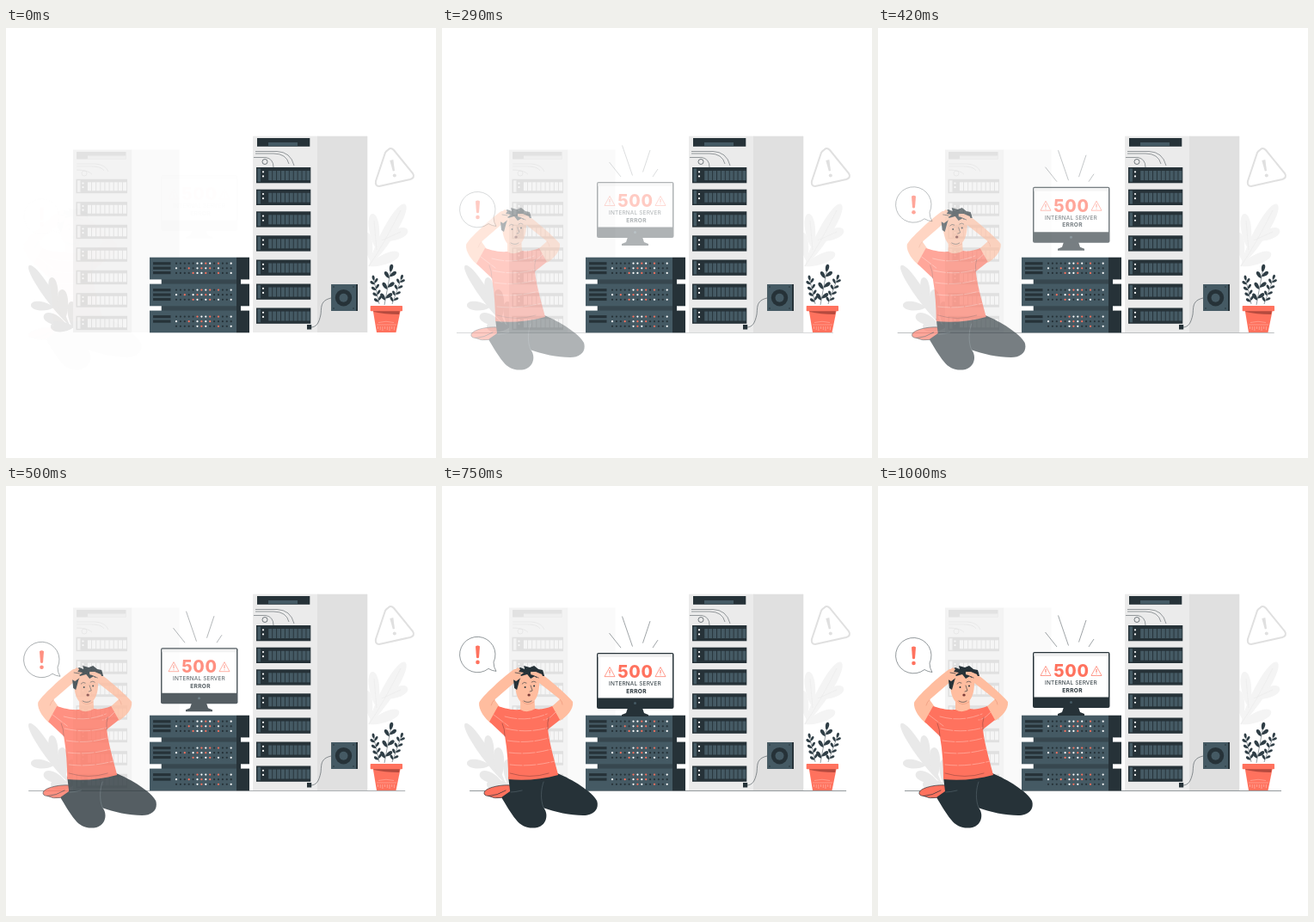
An HTML page that plays this animation: 500x500 px, repeating every 1.04 s.

```html
<!DOCTYPE html>
<html lang="en">
<head>
<meta charset="utf-8">
<title>Internal server error</title>
<style>
html, body { margin: 0; width: 100%; height: 100%; overflow: hidden; background: #fff; }
svg { display: block; width: 100%; height: 100%; }
text { font-family: Inter, "Open Sans", sans-serif; text-anchor: middle; }
</style>
</head>
<body>
<svg viewBox="0 0 500 500">
  <g id="scenery"></g>
  <path id="floor" d="M31 354.500H469" stroke="#263238" stroke-width=".5"/>
  <g id="racks"></g>
  <g id="screen">
    <path d="M216 257H233L235 263L240 265V267H209V265L214 263Z" fill="#263238"/>
    <rect x="180" y="193" width="89.5" height="65" rx="2" fill="#263238"/>
    <path d="M181.500 194.500H268V245.500H181.500Z" fill="#fff"/>
    <path d="M181.500 194.500H268V198H181.500Z" fill="#f0f0f0"/>
    <circle cx="224.500" cy="251.500" r="1.500" fill="#455a64"/>
    <text x="225" y="222.300" font-size="19.500" font-weight="800" letter-spacing=".7" fill="#ff725e">500</text>
    <text x="224.500" y="231.300" font-size="6.500" font-weight="400" letter-spacing=".15" fill="#263238">INTERNAL SERVER</text>
    <text x="226" y="239.500" font-size="6.600" font-weight="700" letter-spacing=".3" fill="#263238">ERROR</text>
    <g id="alerts" fill="none" stroke="#ff725e" stroke-width=".7" stroke-linejoin="round"></g>
    <path d="M194.500 170L208 187M209.500 150.500L221.500 185.500M242 156L233.500 181.500M251 178L245 187" stroke="#263238" stroke-width=".45"/>
  </g>
  <g id="man" stroke-linecap="round" stroke-linejoin="round">
    <path d="M78 348C66 347 50 351 48 356Q47 360 53 360.500Q60 364 68 362.500L80 359Z" fill="#ff725e"/>
    <path d="M78 348C66 347 50 351 48 356Q47 360 53 360.500Q63 360 73 354M53 360.500Q60 364 68 362.500" fill="none" stroke="#263238" stroke-width=".7"/>
    <path d="M90 336L133 334C150 341 173 355 179 366C182 376 175 383 163 383C148 383 130 379 116 374Z" fill="#263238"/>
    <path d="M76 338L118 338L117 374C123 381 121 394 110 397C100 399 91 396 85 388C79 381 73 370 68 362L78 355Z" fill="#263238"/>
    <path d="M117 374C113 365 114 352 117 344M92 354Q84 356 79 356" fill="none" stroke="#607078" stroke-width=".5"/>
    <g fill="#ffbd9f">
      <path d="M66 257L56 276C49 271 41 260 42 252C44 246 72 220 83 213L91 213L92 221L86 226L60 248.500Z"/>
      <path d="M126 257L136 273C144 268 152 260 151 251C146 244 124 225 115 219L106 218L104 225L112 229L136 248Z"/>
      <path d="M90 244V261Q98 267 107 259L106 244Z"/>
      <path d="M84 224C83 241 88 254 97 254C107 254 112 243 112 229L109 218L87 217Z"/>
    </g>
    <path d="M90 260C78 261 68 257 64 256L54 274L72 291C75 308 76 325 76 341C95 343 116 341 134 336C130 320 124 301 122 283L136 272L127 256C120 259 112 260 107 259Q98 265 90 260Z" fill="#ff725e"/>
    <path d="M59 266L76 279M131 263Q123 272 117 272M72 268Q97 275 121 265M73 282Q98 288 122 281M75 296Q99 300 123 293M77 310Q101 313 126 306M78 324Q102 327 130 320" fill="none" stroke="#ffb4a7" stroke-width=".7" stroke-dasharray="14 2"/>
    <path d="M72 291Q72 283 69 276M122 283Q121 275 123 269M78 334Q101 341 123 334" fill="none" stroke="#7c3c38" stroke-width=".5"/>
    <path d="M82 226L84 214L90 211L95 213L94 209L101 211L106 209L111 213L116 214L118 221L114 221L111 228L107 221L102 224L98 219L91 221L89 226L86 237L83 235Z" fill="#263238"/>
    <path d="M81 216L87 211L90 213L88 216L94 217L90 220L92 222L85 227L80 224ZM102 216L108 216L115 219L117 224L111 229L106 226L109 222L102 219Z" fill="#ffbd9f"/>
    <path d="M84 217L90 218M104 220L111 223" fill="none" stroke="#263238" stroke-width=".7"/>
    <path d="M92 230Q94 227 97 229M103 228Q106 226 108 228M102 232L104 238L101 239M94 250Q99 253 103 250" fill="none" stroke="#263238" stroke-width=".6"/>
    <circle cx="95.500" cy="234" r="1" fill="#263238"/>
    <circle cx="106" cy="232.500" r="1" fill="#263238"/>
    <ellipse cx="100" cy="243" rx="1.700" ry="1.500" fill="#7c3c38"/>
    <path d="M60 248.500Q57 251 56 255M136 248Q139 251 139 254M92 250Q97 257 106 251" fill="none" stroke="#e89376" stroke-width=".6"/>
  </g>
  <g id="bubble">
    <path d="M60 206A20.700 20.700 0 1 0 54 213.500Q58 216 63 216.500Q60 212 60 206Z" fill="#fff" stroke="#263238" stroke-width=".5"/>
    <path d="M39 187.500Q41.500 185.500 44 187.500L43 200.500Q41.500 202 40 200.500Z" fill="#ff725e"/>
    <circle cx="41.500" cy="206" r="2.300" fill="#ff725e"/>
  </g>
</svg>
<script>
const $ = id => document.getElementById(id);
const DARK = '#263238', SLATE = '#455a64', RED = '#ff725e', LEAF = '#2f3e46';

const rect = (x, y, w, h, fill) => `<rect x="${x}" y="${y}" width="${w}" height="${h}" fill="${fill}"/>`;
const dot = (x, y, r, fill) => `<circle cx="${x}" cy="${y}" r="${r}" fill="${fill}"/>`;
const line = (d, stroke, w = .7) => `<path d="${d}" fill="none" stroke="${stroke}" stroke-width="${w}"/>`;
const shape = (d, fill) => `<path d="${d}" fill="${fill}"/>`;
const repeat = (n, make) => Array.from({ length: n }, (_, i) => make(i)).join('');

// A leaf from its base (x, y) to its tip, bulging by w on both sides.
function leaf(x, y, tipX, tipY, w, fill) {
  const dx = tipX - x, dy = tipY - y, len = Math.hypot(dx, dy);
  const at = (k, side) => `${x + dx * k - dy / len * w * side} ${y + dy * k + dx / len * w * side}`;
  return shape(`M${x} ${y}C${at(.35, 1)} ${at(1, 1)} ${tipX} ${tipY}C${at(1, -1)} ${at(.35, -1)} ${x} ${y}Z`, fill);
}

// A stem with leaf pairs and one leaf at its end.
function sprig(x, y, topX, topY, pairs, size) {
  const dx = topX - x, dy = topY - y, angle = Math.atan2(dy, dx);
  const twig = (px, py, turn) => leaf(px, py, px + size * Math.cos(angle + turn), py + size * Math.sin(angle + turn), size * .3, LEAF);
  return line(`M${x} ${y}L${topX} ${topY}`, LEAF, .5) + twig(topX, topY, 0) +
    repeat(pairs, i => {
      const k = (i + .6) / pairs;
      return twig(x + dx * k, y + dy * k, .75) + twig(x + dx * (k - .06), y + dy * (k - .06), -.75);
    });
}

function rackUnit(x, y, w, h, slots, c) {
  const left = x + w * .225, step = (w * .775) / slots;
  return rect(x, y, w, h, c.body) + rect(x + 1.5, y + 1.5, 3.5, h - 3, c.strip) +
    dot(x + 8, y + h * .29, 1.1, c.light) + dot(x + 8, y + h * .57, 1.1, c.light) +
    repeat(slots, i => rect(left + i * step, y + h * .22, step - .9, h * .6, c.slot));
}

function serverUnit(y, slats, leds) {
  const colors = { w: '#fff', r: RED, '.': DARK };
  return rect(167, y, 101, 25.7, SLATE) + rect(268, y, 15, 25.7, DARK) +
    repeat(slats, i => rect(171, y + 5.5 + i * 5.4, 20.5, 3.2, DARK)) +
    leds.map((row, r) => [...row].map((c, i) =>
      dot(198 + i * 4.9, y + 7 + r * 5.6, 1.1, colors[c])).join('')).join('');
}

const paleFoliage =
  [[74, 346, 27, 276, 8], [58, 324, 53, 290, 7], [56, 325, 29, 322, 7],
   [68, 340, 65, 304, 8], [70, 345, 44, 334, 8], [79, 348, 52, 347, 8], [78, 349, 76, 318, 7]]
    .map(a => leaf(...a, '#e9e9e9')).join('');

const farFoliage =
  [[422, 277, 464, 205, 10], [431, 258, 426, 216, 8], [437, 247, 467, 235, 8],
   [424, 272, 420, 238, 6], [421, 277, 457, 262, 8]]
    .map(a => leaf(...a, '#f4f4f4')).join('') +
  line('M422 277Q440 250 459 212M431 258L428 224M437 247L459 237', '#e9e9e9', .6);

const sign = line('M444 142Q447 138 451 142L473 169Q476 174 470 176L434 184Q429 184 430 178L441 145Q442 143 444 142Z', '#e0e0e0', 2) +
  shape('M446.300 154L450.300 153L452 166L449.800 166.500Z', '#e0e0e0') + dot(451.800, 171.500, 2, '#e0e0e0');

const pale = { body: '#e0e0e0', strip: '#f2f2f2', light: '#fafafa', slot: '#f5f5f5' };
const bold = { body: DARK, strip: SLATE, light: '#fff', slot: SLATE };

const paleRack = rect(78, 141.5, 68.5, 212.5, '#f3f3f3') + rect(146.5, 141.5, 55, 212.5, '#fafafa') +
  rect(82, 144, 57.5, 8.5, '#e2e2e2') + rect(95, 148.5, 44.5, 4, '#efefef') +
  line('M82 158H104Q116 159 119 167M82 161H100Q111 161 114 166M82 165Q95 165 100 170', '#e4e4e4') +
  `<circle cx="91" cy="169" r="3" fill="none" stroke="#e4e4e4" stroke-width=".7"/>` +
  repeat(7, i => rackUnit(81.5, 175.7 + i * 26.5, 59.5, 16.5, 9, pale));

const boldRack = rect(287, 125.7, 75.5, 228.3, '#ebebeb') + rect(362, 125.7, 58.3, 228.3, '#e0e0e0') +
  rect(292, 128, 61.3, 9.8, DARK) + rect(305, 133, 34, 4.2, SLATE) +
  line('M290 143.500H315Q331 144 335 160M290 146H311Q326 146 329 158M288 150.500H302Q311 152 311 162', DARK, .45) +
  `<circle cx="301" cy="155.500" r="3" fill="none" stroke="${DARK}" stroke-width=".6"/>` +
  [162, 187.7, 213.3, 241.3, 269.5, 297.5, 325.5].map(y => rackUnit(291, y, 63.3, 18.3, 10, bold)).join('') +
  line('M378 314C365 317 367 325 366 333C364 343 361 348 354 348', DARK, .5) + rect(350, 345, 5.2, 5.5, DARK) +
  rect(378.3, 298, 30.7, 31, DARK) + rect(378.3, 298, 28.7, 31, SLATE) +
  dot(392.5, 313.7, 9.7, DARK) + dot(392.5, 313.7, 5, SLATE) +
  [[381, 301], [404, 301], [381, 326], [404, 326]].map(p => dot(...p, .8, DARK)).join('');

const stack = rect(180.5, 291, 92, 40, '#37474f') + rect(268, 291, 5, 40, DARK) +
  rect(167, 292.2, 13.5, 37, '#fff') +
  serverUnit(266.7, 3, ['.....wwrw.r..w', 'w..r.wrwr.w...', '....rwwr..r..w']) +
  serverUnit(297.6, 3, ['.....wrwr.r..w', 'w.r.wrwrw.....', '....rw.wr.w..w']) +
  serverUnit(328.6, 2, ['.....rwwr.r..w', 'w..r.wrwr.....', '.....wrw..r..w']);

const plant = sprig(440, 322, 447, 284, 3, 9.5) + sprig(434, 321, 428, 294, 4, 6.5) + sprig(449, 321, 459, 293, 4, 6.5) +
  shape('M426.500 327H459L453.500 354H431Z', RED) + shape('M427 328.500H458L457 333Q440 333 427.500 330Z', '#b54a3e') +
  `<rect x="423.700" y="323" width="37.300" height="6.300" rx=".8" fill="${RED}"/>` +
  line('M431 345H454M433 342.500Q442 340 451 342.500', '#ffb4a7', .6) +
  repeat(8, i => line(`M${432.5 + i * 2.7} 347V${350 + i % 3}`, '#ffb4a7', .7));

$('scenery').innerHTML = paleFoliage + farFoliage + sign + paleRack;
$('racks').innerHTML = boldRack + stack + plant;
$('alerts').innerHTML = [195, 254].map(x =>
  `<path d="M${x} 209.500L${x + 6} 220.500H${x - 6}Z"/><path d="M${x} 213V217M${x} 218.200V219" stroke-width="1"/>`).join('');

const LOOP = 1040, STEP = 1000 / 24, STEPS = 25, TRAVEL = 22;

// cubic-bezier(.36, -.01, .5, 1.38): rises, overshoots and settles.
function ease(x) {
  const curve = (s, a, b) => 3 * (1 - s) ** 2 * s * a + 3 * (1 - s) * s * s * b + s ** 3;
  let low = 0, high = 1;
  for (let i = 0; i < 24; i++) {
    const mid = (low + high) / 2;
    if (curve(mid, .36, .5) < x) low = mid; else high = mid;
  }
  return curve(low, -.01, 1.38);
}

function place(id, dx, dy, opacity) {
  $(id).setAttribute('transform', `translate(${dx} ${dy})`);
  $(id).setAttribute('opacity', opacity);
}

function render(ms) {
  const tick = Math.floor((ms % LOOP + 5) / STEP);
  const p = ease(Math.min(1, (tick + 1) / STEPS));
  const away = TRAVEL * (1 - p), opacity = Math.max(0, Math.min(1, p));
  place('man', -away, 0, opacity);
  place('floor', -away, 0, opacity);
  place('screen', 0, -away, opacity);
  place('bubble', 0, away, opacity);
}

const start = performance.now();
function frame() {
  render(performance.now() - start);
  requestAnimationFrame(frame);
}
frame();
</script>
</body>
</html>
```
